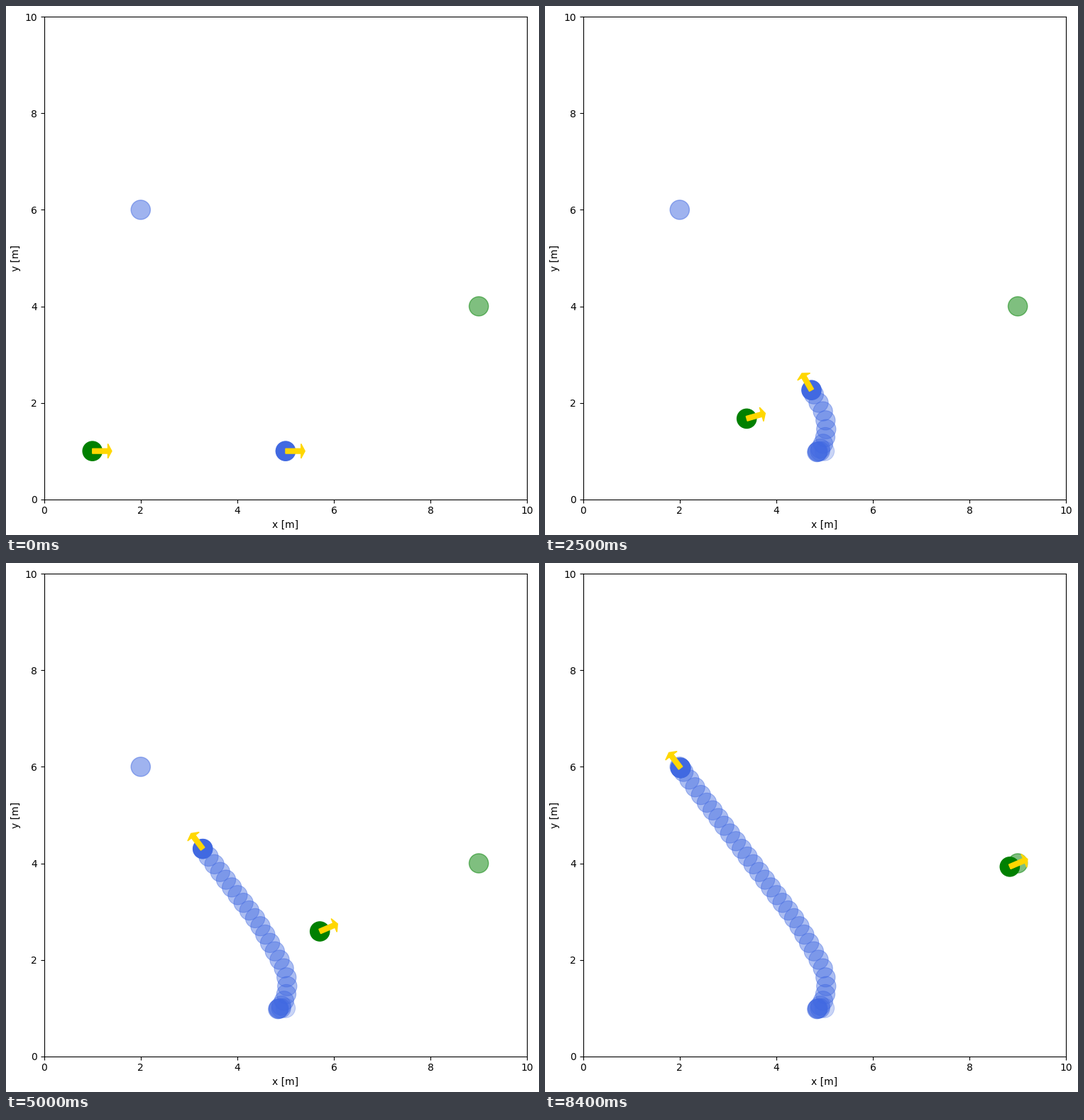
These frames come from a looping animation (751 by 746 pixels, 9400 ms). A matplotlib script:

```python
import math

import matplotlib.pyplot as plt
from matplotlib.animation import FuncAnimation
from matplotlib.patches import Circle, Polygon

W, H, DPI = 751, 746, 100
STEPS, FRAMES = 84, 94
DT, MAX_TURN, RADIUS = 0.1, 0.1, 0.2
AVOID, SWERVE = range(9, 30), 0.11  # steps and angle of mutual avoidance


def simulate(start, goal):
    """Unicycle steering to its goal with a limited turn rate."""
    x, y = start
    theta = 0.0
    poses = [(x, y, theta)]
    for n in range(STEPS):
        dx, dy = goal[0] - x, goal[1] - y
        if math.hypot(dx, dy) >= 0.1:
            aim = math.atan2(dy, dx) - (SWERVE if n in AVOID else 0)
            err = aim - theta
            speed = math.cos(err)
            x += speed * math.cos(theta) * DT
            y += speed * math.sin(theta) * DT
            theta += max(-MAX_TURN, min(MAX_TURN, err))
        poses.append((x, y, theta))
    return poses


def arrow_points(x, y, theta):
    c, s = math.cos(theta), math.sin(theta)
    half = [(0, 0.05), (0.32, 0.05), (0.32, 0.15), (0.4, 0)]
    outline = half + [(u, -v) for u, v in half[-2::-1]]
    return [(x + u * c - v * s, y + u * s + v * c) for u, v in outline]


fig = plt.figure(figsize=(W / DPI, H / DPI), dpi=DPI, facecolor="white")
ax = fig.add_axes([53.7 / W, 50.3 / H, 680.5 / W, 680.5 / H])
ax.set(xlim=(0, 10), ylim=(0, 10), xlabel="x [m]", ylabel="y [m]")


def disc(xy, color, **style):
    return ax.add_patch(Circle(xy, RADIUS, color=color, **style))


class Robot:
    def __init__(self, start, goal, color):
        self.poses = simulate(start, goal)
        disc(goal, color, alpha=0.5, zorder=1)
        self.body = disc(start, color, zorder=3)
        self.arrow = ax.add_patch(
            Polygon(arrow_points(*self.poses[0]), color="gold", zorder=4))

    def show(self, n):
        x, y, theta = self.poses[n]
        self.body.center = x, y
        self.arrow.set_xy(arrow_points(x, y, theta))


green = Robot((1, 1), (9, 4), "green")
blue = Robot((5, 1), (2, 6), "royalblue")
robots = [green, blue]

# the blue robot leaves a disc behind at every second step
trail = [(n, disc(blue.poses[n][:2], "royalblue", lw=0.8, zorder=2,
                  alpha=0.44 if n else 0.28))
         for n in range(0, STEPS + 1, 2)]


def update(frame):
    n = min(frame, STEPS)
    for robot in robots:
        robot.show(n)
    for born, mark in trail:
        mark.set_visible(born <= n)
    return []


anim = FuncAnimation(fig, update, frames=FRAMES, interval=100,
                     init_func=lambda: update(0), repeat=True, repeat_delay=0)
plt.show()
```
